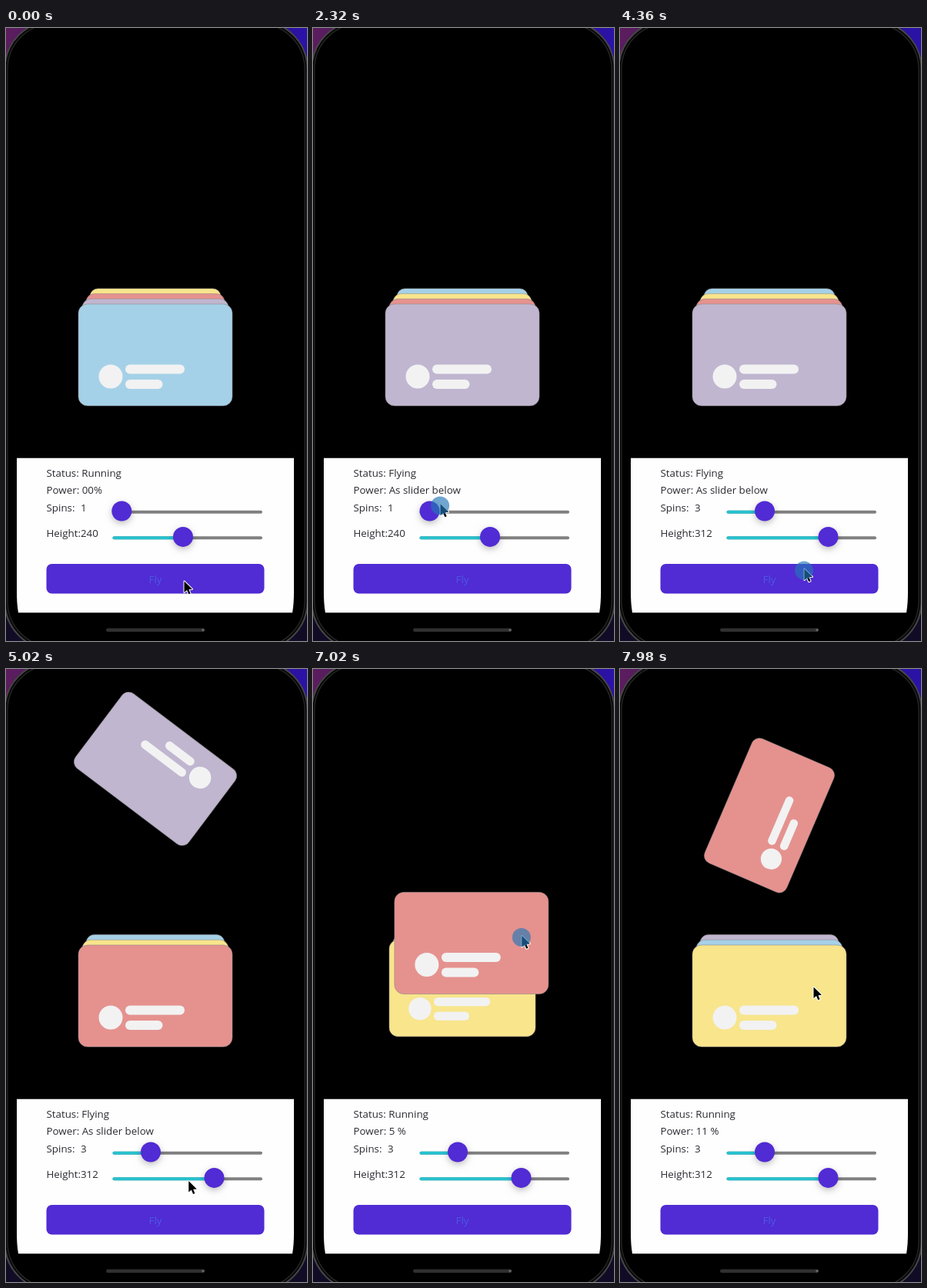
These frames come from a looping animation (391x795 px, 8000 ms). An HTML page with a canvas:

```html
<!DOCTYPE html>
<html lang="en">
<head>
<meta charset="utf-8">
<title>Card stack</title>
<style>
  html, body { margin: 0; width: 100%; height: 100%; overflow: hidden; background: #000; }
  canvas { display: block; width: 391px; height: 795px; }
</style>
</head>
<body>
<canvas id="stage"></canvas>
<script>
const W = 391, H = 795, LOOP = 8000;
const canvas = document.getElementById('stage');
const ctx = canvas.getContext('2d');
const dpr = window.devicePixelRatio || 1;
canvas.width = W * dpr;
canvas.height = H * dpr;

const COLORS = ['#a5d1e8', '#c0b6d0', '#e5928f', '#f8e58c'];
const ACCENT = '#512bd4', TEAL = '#27c2cf', TEXT = '#2b2b33';
const MID = 194, BASE = 424;

// Phases of one flight
const DELAY = 50, RISE = 300, FALL_AT = 462, FALL = 410, SPIN = 788;

// Gestures
const FIRST_TAP = [150, 290], SECOND_TAP = [4310, 4430];
const SPIN_DRAG = [2315, 2500], HEIGHT_DRAG = [3420, 3800];
const GRAB = 6440, PULL = [6690, 7339];
const PRESSES = [FIRST_TAP, SPIN_DRAG, HEIGHT_DRAG, SECOND_TAP, [GRAB, PULL[1]]];
const LAUNCHES = [523, 4600, PULL[1]];

const clamp = v => Math.max(0, Math.min(1, v));
const mix = (a, b, p) => a + (b - a) * p;
const part = (t, [from, to]) => clamp((t - from) / (to - from));
const within = (t, [from, to]) => t >= from && t < to;
const smooth = p => p * p * (3 - 2 * p);
const cubicOut = p => 1 - Math.pow(1 - p, 3);
const sinIn = p => 1 - Math.cos(p * Math.PI / 2);

const spinsAt = t => mix(1, 3, part(t, SPIN_DRAG));
const heightAt = t => mix(240, 312, part(t, HEIGHT_DRAG));

function pointerAt(t) {
  let x = 231, y = 717;
  const glide = (span, toX, toY) => {
    const p = smooth(part(t, span));
    x = mix(x, toX, p);
    y = mix(y, toY, p);
  };
  glide([1640, 2140], 165, 617);
  glide(SPIN_DRAG, 188, 622);
  glide([2690, 3170], 231, 658);
  glide(HEIGHT_DRAG, 271, 659);
  glide([3920, 4250], 239, 701);
  glide([4780, 5300], 234, 617);
  glide([5620, GRAB], 259, 414);
  glide(PULL, 282, 281);
  glide([PULL[1], 7460], 253, 290);
  glide([7460, 7980], 251, 412);
  return { x, y };
}

// How far the front card has been pulled by the pointer
function pullAt(t) {
  if (t < PULL[0]) return { x: 0, y: 0 };
  const from = pointerAt(GRAB), to = pointerAt(Math.min(t, PULL[1]));
  return { x: to.x - from.x, y: to.y - from.y };
}

function box(x, y, w, h, r, fill) {
  ctx.beginPath();
  ctx.roundRect(x, y, w, h, r);
  ctx.fillStyle = fill;
  ctx.fill();
}

function outline(width, color) {
  ctx.lineWidth = width;
  ctx.strokeStyle = color;
  ctx.stroke();
}

function disc(x, y, r, fill) {
  ctx.beginPath();
  ctx.arc(x, y, r, 0, Math.PI * 2);
  ctx.fillStyle = fill;
  ctx.fill();
}

function label(str, x, y, fill = TEXT, align = 'left') {
  ctx.font = '13.35px "Open Sans", sans-serif';
  ctx.textAlign = align;
  ctx.fillStyle = fill;
  ctx.fillText(str, x, y);
}

function card(color, x, y, scale, angle = 0) {
  const ink = '#f2f2f2';
  ctx.save();
  ctx.translate(x, y);
  ctx.rotate(angle);
  ctx.scale(scale, scale);
  box(-100, -66, 200, 132, 12, color);
  outline(1, 'rgba(140,132,134,.55)');
  disc(-58, 28, 15.5, ink);
  box(-39, 12.5, 77, 12, 6, ink);
  box(-39, 32, 48.5, 12, 6, ink);
  ctx.restore();
}

function layer(color, depth) {
  card(color, MID, BASE - 10 * depth, 1 - 0.05 * depth);
}

function flyer(color, launch, age) {
  const thrown = launch === PULL[1];
  const pull = pullAt(launch);
  const spins = thrown ? 1 : Math.round(spinsAt(launch));
  const peak = 164 - 0.48 * (heightAt(launch) - 240);
  const up = cubicOut(clamp(age / RISE));
  const down = sinIn(clamp((age - FALL_AT) / FALL));
  const turn = clamp(age / SPIN);
  const x = MID + pull.x * (1 - up);
  const y = mix(mix(BASE + pull.y, peak, up), BASE - 30, down);
  card(color, x, y, 1 - 0.15 * turn, turn * spins * Math.PI * 2);
}

function cards(t) {
  const count = LAUNCHES.filter(launch => t >= launch + DELAY).length;
  const launch = LAUNCHES[count - 1];
  const age = count ? t - launch : Infinity;
  const flying = age < FALL_AT + FALL;
  const falling = flying && age >= FALL_AT;
  const lag = flying ? 1 - cubicOut(clamp(age / RISE)) : 0;
  const tone = i => COLORS[(count + i) % COLORS.length];

  if (falling) flyer(tone(3), launch, age);
  if (!flying) layer(tone(3), 3);
  layer(tone(2), 2 + lag);
  layer(tone(1), 1 + lag);
  if (count < LAUNCHES.length) {
    const pull = pullAt(t);
    card(tone(0), MID + pull.x, BASE + pull.y, 1);
  } else {
    layer(tone(0), lag);
  }
  if (flying && !falling) flyer(tone(3), launch, age);
}

function phone() {
  const glow = ctx.createLinearGradient(0, 0, W, 0);
  glow.addColorStop(0, '#5c1d5e');
  glow.addColorStop(0.5, '#2a1060');
  glow.addColorStop(1, '#2b12a8');
  ctx.fillStyle = glow;
  ctx.fillRect(0, 0, W, H / 2);
  ctx.fillStyle = '#110b26';
  ctx.fillRect(0, H / 2, W, H / 2);
  box(-1.5, -9, 393, 815, 62, '#090909');
  outline(2, '#464646');
  box(2, -5.5, 386, 808, 59, '#000');
  outline(1.2, '#292929');
  box(130, 778.5, 128, 4.5, 2.2, '#303030');
  disc(256, 780.8, 1.8, '#626262');
}

function panel() {
  ctx.fillStyle = '#fefefe';
  ctx.fill(new Path2D('M14 557.7H374V732Q374 747 372 758.3H16Q14 747 14 732Z'));
}

function slider(x, y) {
  const left = 138.5;
  box(left, y - 0.5, 194.5, 4, 2, '#808080');
  if (x > left + 13) box(left, y - 0.5, x - left, 4, 2, TEAL);
  ctx.save();
  ctx.shadowColor = 'rgba(0,0,0,.25)';
  ctx.shadowBlur = 8 * dpr;
  ctx.shadowOffsetY = 3 * dpr;
  disc(x, y + 0.2, 13, ACCENT);
  ctx.restore();
}

function controls(t) {
  const pulling = t >= PULL[0];
  const waiting = t < LAUNCHES[0] + DELAY;
  let power = 'As slider below';
  if (waiting) power = '00%';
  if (pulling) power = Math.floor(-pullAt(t).y / 12) + ' %';

  label('Status: ' + (waiting || pulling ? 'Running' : 'Flying'), 52.5, 582);
  label('Power: ' + power, 52.5, 604.3);
  label('Spins:', 52.5, 626.5);
  label(String(Math.round(spinsAt(t))), 97, 626.5);
  label('Height:' + Math.round(heightAt(t)), 52.5, 660.3);

  slider(mix(150.3, 188, part(t, SPIN_DRAG)), 626.3);
  slider(mix(230, 270.5, part(t, HEIGHT_DRAG)), 659.7);

  box(52.5, 695, 283, 38.5, 7, ACCENT);
  label('Fly', 194, 719.5, '#4a5be2', 'center');
}

const ARROW = new Path2D('M.5 .5V15L4 12L6.3 17.3L8.6 16.3L6.4 11.2L11 10.8Z');

function pointer(t) {
  const { x, y } = pointerAt(t);
  ctx.save();
  ctx.translate(x, y);
  ctx.lineJoin = 'round';
  ctx.lineWidth = 2;
  ctx.strokeStyle = '#fff';
  ctx.stroke(ARROW);
  ctx.fillStyle = '#000';
  ctx.fill(ARROW);
  if (PRESSES.some(span => within(t, span))) disc(0, 2.5, 12, 'rgba(36,118,182,.65)');
  ctx.restore();
}

function draw(t) {
  ctx.setTransform(dpr, 0, 0, dpr, 0, 0);
  phone();
  panel();
  cards(t);
  controls(t);
  pointer(t);
}

const began = performance.now();
function tick() {
  draw((performance.now() - began) % LOOP);
  requestAnimationFrame(tick);
}
tick();
</script>
</body>
</html>
```
